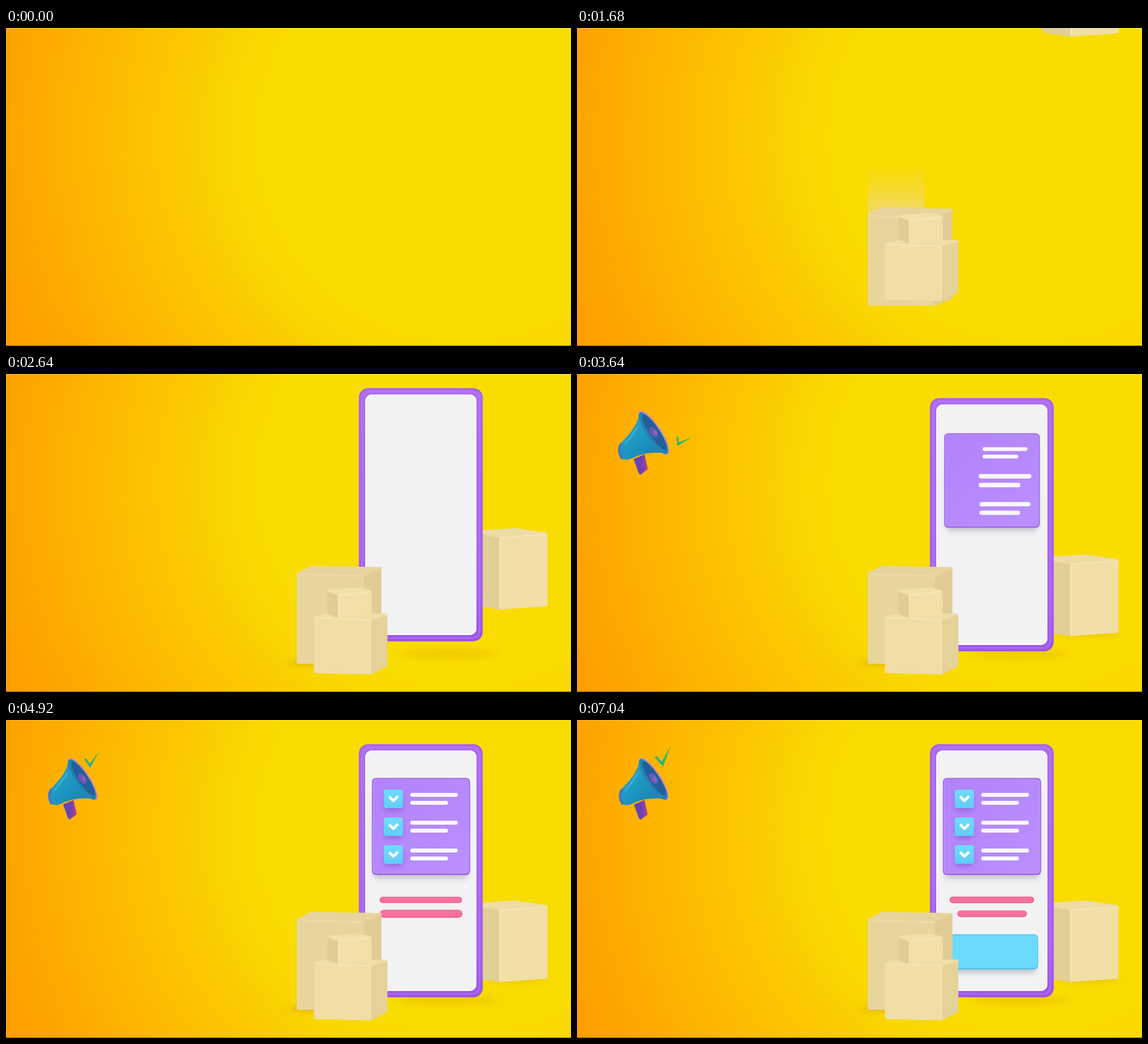
Recreate the animation shown at these times as an HTML page. Size 854 px wide and 480 px high, loop 7080 ms.

```html
<!DOCTYPE html>
<html lang="en">
<head>
<meta charset="utf-8">
<title>Checklist phone</title>
<style>
html, body { margin: 0; width: 100%; height: 100%; overflow: hidden; background: #f9dc00; }
svg { display: block; width: 100vw; height: 100vh; }
</style>
</head>
<body>
<svg viewBox="0 0 854 480" preserveAspectRatio="none">
  <defs>
    <radialGradient id="bg" gradientUnits="userSpaceOnUse" cx="690" cy="165" r="770">
      <stop offset=".39" stop-color="#f9dc00"/>
      <stop offset=".47" stop-color="#fad600"/>
      <stop offset=".55" stop-color="#fbcb00"/>
      <stop offset=".64" stop-color="#fcc100"/>
      <stop offset=".73" stop-color="#fdb700"/>
      <stop offset=".83" stop-color="#feac00"/>
      <stop offset=".9" stop-color="#fea400"/>
      <stop offset="1" stop-color="#ff9d00"/>
    </radialGradient>
    <linearGradient id="trailFill" x1="0" y1="0" x2="0" y2="1">
      <stop offset="0" stop-color="#f3d860" stop-opacity="0"/>
      <stop offset="1" stop-color="#f0d67c" stop-opacity=".9"/>
    </linearGradient>
    <linearGradient id="frame" x1="0" y1="0" x2="0" y2="1">
      <stop offset="0" stop-color="#ae6cf3"/>
      <stop offset=".8" stop-color="#a663f1"/>
      <stop offset="1" stop-color="#9c55ea"/>
    </linearGradient>
    <linearGradient id="cardFill" x1="0" y1="0" x2="1" y2="1">
      <stop offset="0" stop-color="#b282fa"/>
      <stop offset="1" stop-color="#ba90fd"/>
    </linearGradient>
    <linearGradient id="tileFill" x1="0" y1="0" x2="0" y2="1">
      <stop offset="0" stop-color="#6edcfc"/>
      <stop offset="1" stop-color="#5fcdf8"/>
    </linearGradient>
    <linearGradient id="coneFill" x1="0" y1="0" x2="1" y2="1">
      <stop offset=".1" stop-color="#2aa5cb"/>
      <stop offset=".55" stop-color="#1c94bf"/>
      <stop offset="1" stop-color="#1f76ad"/>
    </linearGradient>
    <linearGradient id="gripFill" x1="0" y1="0" x2="1" y2="0">
      <stop offset="0" stop-color="#5548b4"/>
      <stop offset=".6" stop-color="#7640b4"/>
      <stop offset="1" stop-color="#b84886"/>
    </linearGradient>
    <linearGradient id="tickFill" x1="0" y1="1" x2="1" y2="0">
      <stop offset="0" stop-color="#08b3a2"/>
      <stop offset="1" stop-color="#55b83c"/>
    </linearGradient>
    <filter id="soft" x="-50%" y="-100%" width="200%" height="300%"><feGaussianBlur stdDeviation="4"/></filter>
    <filter id="blur" x="-50%" y="-200%" width="200%" height="500%"><feGaussianBlur stdDeviation="9 4"/></filter>
  </defs>
  <rect width="854" height="480" fill="url(#bg)"/>
  <rect width="854" height="1" fill="#fff" opacity=".2"/>
  <rect y="479" width="854" height="1" fill="#6c5a18" opacity=".75"/>
  <g id="scene"></g>
</svg>
<script>
const LOOP = 7080;
const scene = document.getElementById('scene');

const poly = (points, fill) =>
  `<polygon points="${points}" fill="${fill}" stroke="${fill}" stroke-width="3" stroke-linejoin="round"/>`;
const edge = (d, color = '#f9ebc0') =>
  `<path d="${d}" fill="none" stroke="${color}" stroke-width="2" stroke-linecap="round" stroke-linejoin="round" opacity=".6"/>`;
const bar = (x1, x2, y, h, fill) =>
  `<rect x="${x1}" y="${y - h / 2}" width="${x2 - x1}" height="${h}" rx="${h / 2}" fill="${fill}"/>`;
const group = (id, body) => `<g id="${id}">${body}</g>`;
const shadow = (id, cx, cy, rx, ry) =>
  `<ellipse id="${id}" cx="${cx}" cy="${cy}" rx="${rx}" ry="${ry}" fill="#c79000" filter="url(#blur)"/>`;

const rightBox =
  poly('705,279 746,287 746,394 705,388', '#e2cf95') +
  poly('747,287 817,282 817,389 747,394', '#f1dfa6') +
  poly('705,278 770,274 817,281 746,286', '#eedca4') +
  edge('M747 392V287L816 282');

const backBox =
  poly('441,302 541,305 541,436 441,436', '#e8d59e') +
  poly('542,305 566,293 566,426 542,436', '#e0cc94') +
  poly('441,301 462,291 566,293 541,304', '#e7d49d') +
  edge('M442 302L540 305', '#f2e0b0');

const frontBox =
  poly('467,368 551,371 551,452 467,450', '#f0dea5') +
  poly('552,371 575,364 575,440 552,452', '#e5d298') +
  poly('467,367 484,363 575,363 551,370', '#f0dea6') +
  edge('M468 368L551 371V450');

const smallBox =
  poly('487,328 502,334 502,367 487,361', '#e1cd93') +
  poly('503,334 551,329 551,363 503,367', '#f2e0a8') +
  poly('487,327 533,324 551,328 503,333', '#f2e0a9') +
  edge('M503 366V334L550 329');

const phone =
  `<rect x="533.5" y="36.5" width="187" height="382" rx="14" fill="url(#frame)"/>
   <rect x="534.5" y="37.5" width="185" height="380" rx="13" fill="none" stroke="#9650e2" stroke-width="1.5" opacity=".55"/>
   <rect x="538.5" y="41.5" width="177" height="372" rx="11" fill="none" stroke="#b87cf8" stroke-width="2" opacity=".6"/>
   <rect x="543" y="46" width="168" height="363" rx="10" fill="#f2f2f4"/>
   <rect x="544" y="47" width="166" height="361" rx="9" fill="none" stroke="#fff" stroke-width="2"/>`;

const card =
  `<rect x="556" y="108" width="142" height="131" rx="6" fill="#8d8798" opacity=".45" filter="url(#soft)"/>
   <rect x="553" y="87.5" width="148.5" height="146.5" rx="6" fill="#9c63e8"/>
   <rect x="554" y="89" width="146" height="143" rx="5" fill="url(#cardFill)"/>
   <rect x="555" y="90" width="144" height="141" rx="4" fill="none" stroke="#c39fff" stroke-width="1" opacity=".5"/>`;

const row = y => bar(611, 683, y - 6, 6, '#fbf6ff') + bar(611, 668, y + 6, 6, '#fbf6ff');

const tile = y =>
  `<rect x="573" y="${y - 8}" width="25" height="25" rx="3" fill="#5b35a8" opacity=".45" filter="url(#soft)"/>
   <rect x="571" y="${y - 14}" width="29" height="28" rx="3.5" fill="url(#tileFill)"/>
   <path d="M579 ${y - 3.5}l6.5 6.5l7 -7" fill="none" stroke="#fff" stroke-width="4" stroke-linejoin="round"/>`;

const pinkBar = (x1, x2, y) => bar(x1, x2, y, 10, '#ec5f92') + bar(x1 + 1, x2 - 1, y - .5, 7.5, '#f8719f');

const button =
  `<rect x="560" y="336" width="133" height="45" rx="6" fill="#7d8a96" opacity=".5" filter="url(#soft)"/>
   <rect x="557" y="323.5" width="140" height="53" rx="6" fill="#55c4ee"/>
   <rect x="558" y="325" width="138" height="49" rx="5" fill="#6adbfd"/>`;

const horn =
  `<path d="M86 128L102 121L107 143L96 151Q93 150 91 142Z" fill="url(#gripFill)"/>
   <path d="M95 58C92 76 84 87 67 104C62 111 64 124 70 128C76 130 81 128 87 125C103 118 119 117 137 120Z" fill="url(#coneFill)"/>
   <path d="M67 106Q62 115 68 126" fill="none" stroke="#3f78c6" stroke-width="4" stroke-linecap="round"/>
   <path d="M92 80Q85 92 73 106" fill="none" stroke="#4fc0dc" stroke-width="3" stroke-linecap="round" opacity=".5"/>
   <g transform="translate(116 89) rotate(56.5)">
     <ellipse rx="38" ry="11" fill="#c987c4"/>
     <ellipse rx="36.5" ry="10" cy="1" fill="#1f84b4"/>
     <ellipse rx="31" ry="7.5" cy="-1" fill="#235f98"/>
     <ellipse rx="9" ry="5" cx="-1" cy="0" fill="#6a58b4"/>
     <ellipse rx="4" ry="2.5" cx="1" cy="-2" fill="#8a62c0"/>
   </g>`;

const tick = id => `<path id="${id}" d="M-12 -14L-8 -15L-1 -7L13 -32L1 0Z" fill="url(#tickFill)"/>`;

const rows = [119, 161, 203];
scene.innerHTML =
  shadow('phoneShade', 668, 422, 74, 8) +
  shadow('rightShade', 772, 392, 46, 3) +
  shadow('backShade', 462, 436, 34, 3) +
  group('rightBox', rightBox) +
  group('phone', phone +
    group('card', card) +
    rows.map((y, i) => group('row' + i, row(y)) + group('tile' + i, tile(y))).join('') +
    group('pink0', pinkBar(563, 691, 271.5)) +
    group('pink1', pinkBar(575, 680, 292.5)) +
    group('button', button)) +
  '<rect id="trail" x="440" width="85" fill="url(#trailFill)"/>' +
  group('backBox', backBox) +
  group('frontBox', frontBox) +
  group('smallBox', smallBox) +
  group('horn', horn) +
  tick('tickTop') + tick('tickSide');

const el = {};
scene.querySelectorAll('[id]').forEach(n => el[n.id] = n);

const clamp = x => Math.min(1, Math.max(0, x));

// id: start, duration, drop height
const drops = {
  backBox: [835, 1300, 440],
  frontBox: [965, 1300, 455],
  smallBox: [1017, 1300, 370],
  rightBox: [1660, 1835, 396],
  phone: [1770, 1300, 420]
};

// id: start, centre x, centre y
const pops = {
  card: [3266, 627, 161],
  pink0: [4660, 627, 271.5],
  pink1: [4812, 627.5, 292.5],
  button: [5200, 627, 350]
};
rows.forEach((y, i) => {
  pops['row' + i] = [3310 + 120 * i, 647, y];
  pops['tile' + i] = [3760 + 180 * i, 585.5, y];
});

const liftAt = (t, [start, span, height]) => height * (1 - clamp((t - start) / span)) ** 3;

function spring(t) {
  if (t <= 0) return 0;
  const a = t * .019;
  return Math.max(0, 1 - Math.exp(-.454 * a) * Math.cos(a));
}

function place(node, x, y, scale, turn = 0) {
  node.setAttribute('visibility', scale > .01 ? 'visible' : 'hidden');
  node.setAttribute('transform', `translate(${x} ${y}) rotate(${turn}) scale(${scale})`);
}

function pop(node, x, y, scale) {
  node.setAttribute('visibility', scale > .005 ? 'visible' : 'hidden');
  node.setAttribute('transform', `translate(${x} ${y}) scale(${scale}) translate(${-x} ${-y})`);
}

// Swells from 0 to 1 and back within one of the listed bursts
function burst(t, starts, life) {
  const s = starts.find(s => t >= s && t < s + life);
  return s === undefined ? 0 : Math.sin(Math.PI * (t - s) / life) ** .6;
}

function draw(t) {
  const lift = {};
  for (const id in drops) {
    lift[id] = liftAt(t, drops[id]);
    el[id].setAttribute('transform', `translate(0 ${-lift[id]})`);
    el[id].setAttribute('visibility', t >= drops[id][0] ? 'visible' : 'hidden');
  }
  el.phoneShade.setAttribute('opacity', .2 * clamp(1 - lift.phone / 150));
  el.rightShade.setAttribute('opacity', .4 * clamp(1 - lift.rightBox / 40));
  el.backShade.setAttribute('opacity', .7 * clamp(1 - lift.backBox / 12));

  const length = Math.min(90, lift.backBox * 4);
  el.trail.setAttribute('y', 300 - lift.backBox - length);
  el.trail.setAttribute('height', length);
  el.trail.setAttribute('visibility', t > drops.backBox[0] && length > 1 ? 'visible' : 'hidden');

  for (const id in pops) {
    const [start, x, y] = pops[id];
    pop(el[id], x, y, spring(t - start));
  }

  const pulse = 1 + .018 * Math.cos((t - 3640) / 2560 * 2 * Math.PI);
  pop(el.horn, 104, 104, spring(t - 2800) * pulse);

  const top = burst(t, [4226, 6560], 960);
  place(el.tickTop, 112 + 17 * top, 84 - 14 * top, top, 55 * (1 - top));
  const side = burst(t, [3190, 5000, 7025], 900);
  place(el.tickSide, 140 + 11 * side, 93 + 15 * side, .77 * side, 39);
}

const began = performance.now();
function frame() {
  draw((performance.now() - began) % LOOP);
  requestAnimationFrame(frame);
}
draw(0);
requestAnimationFrame(frame);
</script>
</body>
</html>
```
